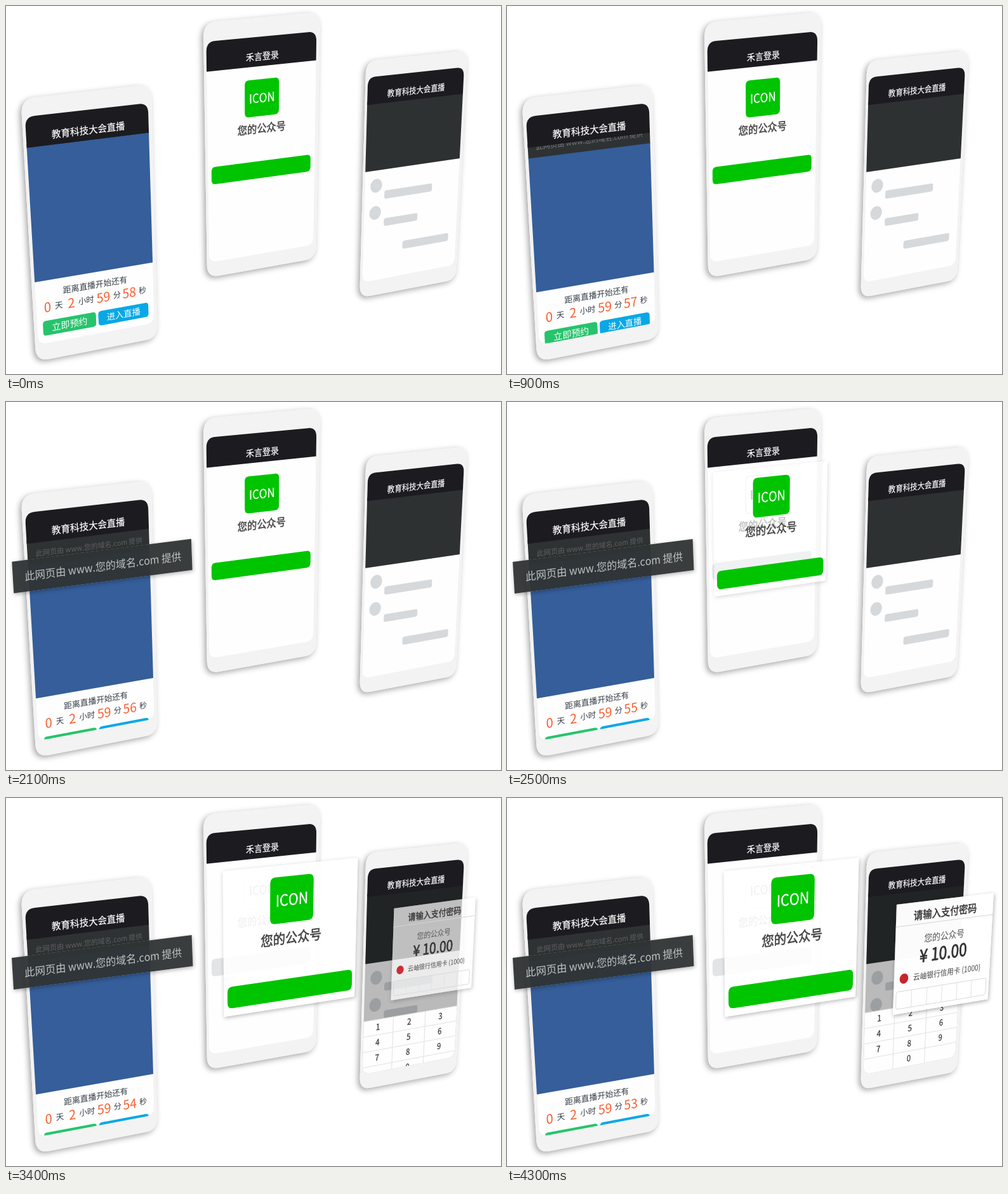
An HTML page with a canvas for the animation above (5.1 s loop, 780 px wide and 580 px high).

```html
<!DOCTYPE html>
<html lang="zh-CN">
<head>
<meta charset="utf-8">
<title>Phones</title>
<style>
html, body { margin: 0; width: 100%; height: 100%; overflow: hidden; background: #fff; }
canvas { display: block; }
</style>
</head>
<body>
<canvas id="stage" width="780" height="580"></canvas>
<script>
const ctx = document.getElementById('stage').getContext('2d');
const FONT = '"Noto Sans CJK SC", "Noto Sans CJK", "Noto Sans", sans-serif';
const LOOP = 5100, STEP = 100;
const W = 300, H = 534, HEAD = 69, PULL = 48.5;
const INK = '#333c46', GREEN = '#00c400', DARK = '#1b1b20';

const lerp = (a, b, p) => a + (b - a) * p;
const ease = p => p < .5 ? 4 * p ** 3 : 1 - 4 * (1 - p) ** 3;
const phase = (t, start, length = 700) => ease(Math.min(1, Math.max(0, (t - start) / length)));
const mix = (a, b, p) => a.map((v, i) => lerp(v, b[i], p));

// A flat sheet of w by h units seen in perspective; corners run clockwise from top left.
class Sheet {
  constructor([x0, y0, x1, y1, x2, y2, x3, y3], w, h) {
    const ax = x1 - x2, bx = x3 - x2, sx = x0 - x1 + x2 - x3;
    const ay = y1 - y2, by = y3 - y2, sy = y0 - y1 + y2 - y3;
    const det = ax * by - bx * ay;
    const g = (sx * by - bx * sy) / det, k = (ax * sy - sx * ay) / det;
    this.w = w;
    this.h = h;
    this.at = (x, y) => {
      const u = x / w, v = y / h, d = 1 + g * u + k * v;
      return [
        (x0 + (x1 - x0 + g * x1) * u + (x3 - x0 + k * x3) * v) / d,
        (y0 + (y1 - y0 + g * y1) * u + (y3 - y0 + k * y3) * v) / d
      ];
    };
  }

  trace(x, y, w, h, r = 0) {
    const X = x + w, Y = y + h;
    const move = (a, b) => ctx.moveTo(...this.at(a, b));
    const line = (a, b) => ctx.lineTo(...this.at(a, b));
    const bend = (a, b, c, d) => ctx.quadraticCurveTo(...this.at(a, b), ...this.at(c, d));
    move(x + r, y);
    line(X - r, y); bend(X, y, X, y + r);
    line(X, Y - r); bend(X, Y, X - r, Y);
    line(x + r, Y); bend(x, Y, x, Y - r);
    line(x, y + r); bend(x, y, x + r, y);
    ctx.closePath();
  }

  box(x, y, w, h, color, r) {
    ctx.beginPath();
    this.trace(x, y, w, h, r);
    ctx.fillStyle = color;
    ctx.fill();
  }

  frame(x, y, w, h, color, r) {
    ctx.beginPath();
    this.trace(x, y, w, h, r);
    ctx.strokeStyle = color;
    ctx.lineWidth = 1;
    ctx.stroke();
  }

  line(x, y, X, Y, color) {
    ctx.beginPath();
    ctx.moveTo(...this.at(x, y));
    ctx.lineTo(...this.at(X, Y));
    ctx.strokeStyle = color;
    ctx.lineWidth = 1;
    ctx.stroke();
  }

  disc(x, y, r, color) {
    ctx.beginPath();
    for (let i = 0; i < 32; i++) {
      const a = i * Math.PI / 16;
      ctx.lineTo(...this.at(x + r * Math.cos(a), y + r * Math.sin(a)));
    }
    ctx.fillStyle = color;
    ctx.fill();
  }

  // Each letter takes the local slope of the sheet; heavy adds a fine outline.
  text(str, x, y, size, color, { align = 'center', heavy = 0 } = {}) {
    ctx.font = `${size}px ${FONT}`;
    ctx.fillStyle = ctx.strokeStyle = color;
    ctx.lineWidth = size * heavy;
    ctx.lineJoin = 'round';
    ctx.textAlign = 'center';
    ctx.textBaseline = 'middle';
    if (align === 'center') x -= ctx.measureText(str).width / 2;
    for (const c of str) {
      const adv = ctx.measureText(c).width, m = x + adv / 2;
      const [px, py] = this.at(m, y);
      const [rx, ry] = this.at(m + 1, y);
      const [dx, dy] = this.at(m, y + 1);
      ctx.save();
      ctx.transform(rx - px, ry - py, dx - px, dy - py, px, py);
      ctx.fillText(c, 0, 0);
      if (heavy) ctx.strokeText(c, 0, 0);
      ctx.restore();
      x += adv;
    }
  }

  // Shadow only outside the sheet, so that see-through sheets stay clean.
  shadow(alpha, blur, ox, oy, r = 0) {
    ctx.save();
    ctx.beginPath();
    ctx.rect(0, 0, 780, 580);
    this.trace(0, 0, this.w, this.h, r);
    ctx.clip('evenodd');
    ctx.shadowColor = `rgba(0,0,0,${alpha})`;
    ctx.shadowBlur = blur;
    ctx.shadowOffsetX = ox;
    ctx.shadowOffsetY = oy;
    this.box(0, 0, this.w, this.h, '#f3f3f3', r);
    ctx.restore();
  }
}

function phone(outer, inner, title, drawScreen) {
  const body = new Sheet(outer, 320, 630);
  const screen = new Sheet(inner, W, H);
  body.shadow(.36, 10, -3, 3, 34);
  body.box(0, 0, 320, 630, '#f3f3f3', 34);
  ctx.save();
  ctx.beginPath();
  screen.trace(0, 0, W, H, 23);
  ctx.clip();
  screen.box(0, 0, W, H, '#fefefe');
  drawScreen(screen);
  screen.box(-2, -2, W + 4, HEAD + 2, DARK);
  screen.text(title, 150, 45.7, 22.5, '#fff', { heavy: .015 });
  ctx.restore();
}

const withAlpha = (a, draw) => {
  ctx.save();
  ctx.globalAlpha = a;
  draw();
  ctx.restore();
};

// Countdown page
const stripIn = [32.7, 223.5, 225.2, 200.5, 226.2, 233.5, 35, 257.5];
const stripOut = [9, 252, 292.6, 216, 294.5, 265, 12, 302];
const NOTICE = '此网页由 www.您的域名.com 提供';

function countdown(s, t, lifted) {
  const y = PULL * phase(t, 550);
  const sec = 58 - Math.floor((t + 700) / 1000);
  s.box(-2, HEAD - 8, W + 4, y + 10, '#2f3233');
  s.text(NOTICE, 150, HEAD + y - PULL / 2, 17, lifted ? '#5c6061' : '#787b7c');
  s.box(-2, HEAD + y, W + 4, 312.5, '#355e9a');
  s.text('距离直播开始还有', 150, 412 + y, 20.5, INK);
  const row = [['0', 28], ['天', 56], ['2', 87.5], ['小时', 125], ['59', 169], ['分', 204], [String(sec), 236], ['秒', 271]];
  row.forEach(([str, x], i) => {
    const label = i % 2;
    s.text(str, x, 446 + y, label ? 20 : 32, label ? INK : '#fb5d2f');
  });
  s.box(14, 479 + y, 134, 36, '#26c46c', 8);
  s.text('立即预约', 81, 497 + y, 22.5, '#fff');
  s.box(154, 479 + y, 131, 36, '#08a8e6', 8);
  s.text('进入直播', 219.5, 497 + y, 22, '#fff');
}

function notice(p) {
  const s = new Sheet(mix(stripIn, stripOut, p), W, PULL);
  const a = Math.min(1, 1.5 * p);
  withAlpha(a, () => s.shadow(.3, 6, 1, 2));
  withAlpha(a * .95, () => s.box(0, 0, W, PULL, '#2f3334'));
  const g = Math.round(lerp(128, 192, p));
  s.text(NOTICE, 150, PULL / 2 + .5, 17, `rgb(${g},${g + 2},${g + 2})`);
}

// Login page
const cardIn = [317.6, 109.2, 485.6, 92.5, 483.2, 269, 319.6, 291.7];
const cardOut = [341.5, 115.5, 554.5, 94, 549, 313, 343.5, 345];

function loginCard(s, ghost) {
  s.box(102, 22, 97, 90, ghost ? '#fff' : GREEN, 11);
  if (ghost) s.frame(102, 22, 97, 90, '#e2e2e2', 11);
  s.text('ICON', 150, 67, 30.5, ghost ? '#8c8c8c' : '#fff', { heavy: .015 });
  s.text('您的公众号', 150, 142.5, 27.5, ghost ? '#8c8c8c' : '#444', { heavy: .03 });
  s.box(8, 224, 285, 43, ghost ? '#e2e4e6' : GREEN, 11);
}

function login(p) {
  const s = new Sheet(mix(cardIn, cardOut, p), W, 282);
  const a = Math.min(1, 1.8 * p);
  withAlpha(a, () => s.shadow(.28, 6, 1, 2));
  withAlpha(a * .89, () => s.box(0, 0, W, 282, '#fff'));
  loginCard(s, false);
}

// Payment page
const payIn = [609, 180, 713, 163.5, 708.5, 281, 605, 296];
const payOut = [614, 168, 767, 149.5, 757.5, 317, 608, 342];

function chat(s, t) {
  const grey = '#d6d9dc';
  s.box(-2, HEAD - 8, W + 4, 248 - HEAD, '#2d3132');
  s.disc(35, 280, 18, grey);
  s.box(61, 296, 152, 22, grey, 6);
  s.disc(34, 351.5, 18, grey);
  s.box(62, 370, 107, 21, grey, 6);
  s.box(124, 440, 150, 22, grey, 6);

  const p = phase(t, 2930);
  if (!p) return;
  withAlpha(.27 * Math.min(1, 1.2 * p), () => s.box(-2, HEAD - 8, W + 4, H, '#000'));
  const top = lerp(H, 368, p), row = 41.5;
  s.box(-2, top, W + 4, 170, '#fefefe');
  for (let i = 0; i < 4; i++) s.line(0, top + i * row, W, top + i * row, '#e0e1e2');
  for (const x of [93, 196]) s.line(x, top, x, top + 4 * row, '#e0e1e2');
  for (let n = 1; n < 11; n++) {
    const i = n === 10 ? 10 : n - 1;
    s.text(String(n % 10), [45, 144, 246][i % 3], top + (Math.floor(i / 3) + .48) * row, 23, '#333', { heavy: .02 });
  }
}

function payment(p) {
  const s = new Sheet(mix(payIn, payOut, p), W, 280);
  const a = Math.min(1, 1.45 * p);
  withAlpha(a, () => s.shadow(.32, 6, 1, 2));
  withAlpha(a * .98, () => s.box(0, 0, W, 280, '#fff'));
  withAlpha(Math.min(1, 1.9 * p), () => {
    s.text('请输入支付密码', 150, 33, 28, '#333', { heavy: .03 });
    s.line(0, 56, W, 56, '#d5d5d5');
    s.text('您的公众号', 150, 94, 25, '#555');
    s.text('¥ 10.00', 149, 137, 45, '#333', { heavy: .035 });
    s.disc(30, 190, 13, '#c8242f');
    s.text('云岫银行信用卡 (1000)', 58, 190, 21, '#444', { align: 'left' });
    s.frame(8, 222, 283, 45, '#d9d9d9', 5);
    for (let i = 1; i < 6; i++) {
      const x = 8 + i * 283 / 6;
      s.line(x, 222, x, 267, '#e2e2e2');
    }
  });
}

function draw(t) {
  ctx.fillStyle = '#fff';
  ctx.fillRect(0, 0, 780, 580);
  const p1 = phase(t, 1500), p2 = phase(t, 2210), p3 = phase(t, 3050);

  phone([23.3, 146.5, 228.8, 123.5, 239, 523, 47.5, 560.5],
    [29.8, 174.8, 223.7, 152.8, 233.9, 499.5, 51, 534],
    '教育科技大会直播', s => countdown(s, t, p1 > 0));
  phone([310.8, 26, 495, 9.3, 488.5, 397.5, 317, 428.5],
    [315.5, 56.4, 489.3, 40, 484.3, 376.5, 320, 404.5],
    '禾言登录', () => loginCard(new Sheet(cardIn, W, 282), p2 > 0));
  phone([567.3, 86.7, 727.5, 70, 709, 431, 557.2, 460],
    [570.3, 112.5, 722, 96.3, 706.5, 408, 561.5, 436],
    '教育科技大会直播', s => chat(s, t));

  if (p1) notice(p1);
  if (p2) login(p2);
  if (p3) payment(p3);
}

const begin = performance.now();
function tick() {
  const t = (performance.now() - begin) % LOOP;
  draw(Math.floor(t / STEP) * STEP);
  requestAnimationFrame(tick);
}
tick();
</script>
</body>
</html>
```
